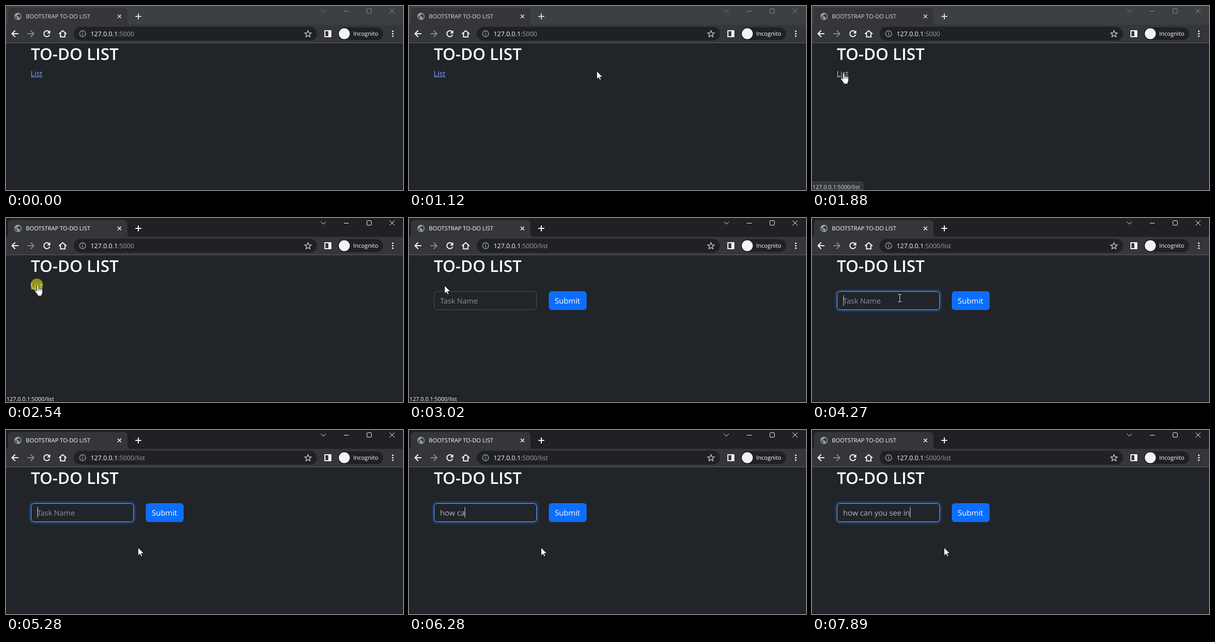
An HTML page for the animation above (8 s loop, 798 px wide and 372 px high).

```html
<!DOCTYPE html>
<html lang="en">
<head>
<meta charset="utf-8">
<title>To-do list</title>
<style>
  html, body { margin: 0; width: 100%; height: 100%; overflow: hidden; background: #212529; }
  svg { display: block; width: 798px; height: 372px; }
  text { font-family: "Open Sans", "Noto Sans", sans-serif; text-rendering: geometricPrecision; white-space: pre; }
  .line { fill: none; stroke: #fff; stroke-width: 2; }
  .dim { stroke: #85878a; }
  #win { --strip: #202124; --ink: #fff; --tool: #fff; --bubble: #202124; --edge: #25272a; }
  #win.idle { --strip: #3c4043; --ink: #dadce0; --tool: #8d9093; --bubble: #35363a; --edge: #4a4d51; }
</style>
</head>
<body>
<svg viewBox="0 0 798 372">
  <rect width="798" height="372" fill="#212529"/>
  <rect y="370" width="798" height="2" fill="#1c1e25"/>

  <g id="win">
    <rect width="798" height="38" fill="var(--strip)"/>
    <path d="M0 38q4 0 4-6V12q0-8 8-8H236q8 0 8 8V30q0 8 8 8Z" fill="#35363a"/>
    <path transform="translate(15.4 12.4) scale(.72)" fill="#9aa0a6" d="M12 2C6.48 2 2 6.48 2 12s4.48 10 10 10 10-4.48 10-10S17.52 2 12 2zm-1 17.93c-3.95-.49-7-3.85-7-7.93 0-.62.08-1.21.21-1.79L9 15v1c0 1.1.9 2 2 2v1.93zm6.9-2.54c-.26-.81-1-1.39-1.9-1.39h-1v-3c0-.55-.45-1-1-1H8v-2h2c.55 0 1-.45 1-1V7h2c1.1 0 2-.9 2-2v-.41c2.93 1.19 5 4.06 5 7.41 0 2.08-.8 3.97-2.1 5.39z"/>
    <text x="40" y="25" font-size="11.5" fill="var(--ink)">BOOTSTRAP TO-DO LIST</text>
    <g class="line" style="stroke: var(--ink)">
      <path d="M224.5 17.5l7 7m0-7l-7 7" stroke-width="1.6"/>
      <path d="M260 21h12M266 15v12"/>
    </g>
    <path class="line" style="stroke: var(--tool); stroke-width: 1" d="M633 7.5l5 5 5-5M679 10.5h10M726.5 5.5h7q1 0 1 1v7q0 1-1 1h-7q-1 0-1-1v-7q0-1 1-1ZM771 5l10 10m0-10l-10 10"/>

    <rect y="38" width="798" height="36" fill="#35363a"/>
    <rect y="74" width="798" height="1" fill="#626468"/>
    <path class="line" d="M25 56H12M18.5 49.5L12 56l6.500 6.500"/>
    <path class="line dim" d="M43 56h13M49.500 49.500L56 56l-6.500 6.500"/>
    <path class="line" d="M86.500 51.800A6 6 0 1 0 87.800 58"/>
    <path fill="#fff" d="M89 49v6.500h-6.500Z"/>
    <path class="line" d="M106.500 56.500L114 49.800l7.500 6.700M109.500 55v7.500h9V55"/>

    <rect x="136" y="42" width="489" height="28" rx="14" fill="#202124"/>
    <circle class="line" cx="154" cy="56" r="6" style="stroke: #9aa0a6; stroke-width: 1.4"/>
    <path d="M153.300 55h1.500v4.500h-1.500ZM153.300 52.300h1.500v1.500h-1.500Z" fill="#9aa0a6"/>
    <text x="170" y="60.600" font-size="12.9" fill="#fff">127.0.0.1<tspan id="path" fill="#9aa0a6"></tspan></text>
    <path class="line" style="stroke: #c8cacd; stroke-width: 1.4" d="M607 49.800l1.900 4.300 4.700.4-3.600 3.100 1.100 4.600-4.100-2.400-4.100 2.400 1.100-4.600-3.600-3.100 4.700-.4Z"/>
    <path class="line" d="M641 50h12v12h-12Z"/>
    <rect x="648" y="50" width="5" height="12" fill="#fff"/>
    <rect x="667" y="43" width="91" height="26" rx="13" fill="#202124"/>
    <circle cx="680" cy="56" r="11" fill="#f1f3f4"/>
    <text x="698" y="60.300" font-size="11.6" fill="#fff">Incognito</text>
    <g fill="#fff">
      <circle cx="777.5" cy="51" r="1.600"/><circle cx="777.5" cy="56" r="1.600"/><circle cx="777.5" cy="61" r="1.600"/>
    </g>

    <g id="status">
      <path d="M0 355.500H98.500q4 0 4 4V372H0Z" fill="var(--bubble)" stroke="var(--edge)"/>
      <text x="1" y="369.700" font-size="11.25" fill="var(--ink)">127.0.0.1:5000/list</text>
    </g>
  </g>

  <text x="50" y="109" font-size="32.7" font-weight="600" fill="#fff">TO-DO LIST</text>

  <g id="home">
    <text x="49.500" y="142" font-size="14.8">List</text>
    <rect x="50" y="143" width="23" height="1"/>
  </g>

  <g id="form">
    <rect id="ring" x="48" y="146" width="211" height="42" rx="8" fill="none" stroke="#0d6efd" stroke-width="4"/>
    <rect id="field" x="50.500" y="148.500" width="206" height="37" rx="6" fill="#212529"/>
    <text id="entry" x="62.500" y="173"></text>
    <rect id="caret" y="156" width="1" height="21" fill="#dee2e6"/>
    <rect id="button" x="281" y="148" width="76" height="38" rx="6"/>
    <text x="293" y="173" font-size="15.4" fill="#fff">Submit</text>
  </g>

  <circle id="press" r="12.500" fill="#ff0" opacity=".5"/>
  <g id="pointer">
    <path id="arrow" d="M.5.8V17L4.300 13.400 6.700 18.700 9.100 17.600 6.800 12.400H12Z" fill="#fff" stroke="#000" stroke-width=".8"/>
    <g id="hand" transform="translate(-5)" stroke="#000" stroke-width=".8">
      <path fill="#fff" d="M5 13V2.200a1.600 1.600 0 0 1 3.200 0V7.500a1.500 1.500 0 0 1 2.800.6 1.500 1.500 0 0 1 2.700.7 1.400 1.400 0 0 1 2.600 1V15.500c0 2-1 3.500-1.700 5V22.500H6.800V20.800C5 18.500 3 15.500 1 13a1.600 1.600 0 0 1 2.400-2Z"/>
      <path d="M8.200 7.500V12M11 8.500V12M13.700 9.500V12" fill="none"/>
    </g>
    <path id="beam" d="M-3.500-7.500h2.500q1.500 0 1.500 1.500 0-1.500 1.500-1.500h2M.5-6V6M-3.500 7.500h2.500q1.500 0 1.500-1.500 0 1.500 1.500 1.500h2" fill="none" stroke="#e8e8e8"/>
  </g>
</svg>
<script>
const $ = id => document.getElementById(id);
const show = (id, on) => $(id).style.display = on ? "" : "none";
const paint = (id, name, value) => $(id).setAttribute(name, value);
const clamp = v => Math.max(0, Math.min(1, v));
const between = (t, a, b) => t >= a && t < b;

const LOOP = 8000, ACTIVE = 2540, LOADED = 2680, FOCUS = 4130;
const MESSAGE = "how can you see in";
const KEYS = [5740, 5810, 5940, 6010, 6150, 6280, 6480, 6550, 6810,
              6940, 7080, 7140, 7340, 7410, 7610, 7760, 7820, 7890];

// from, to, steps, end x, end y, upward bend, even speed
const MOVES = [
  [520, 650, 3, 407, 150, 0, true],
  [980, 1740, 11, 64, 137, 55],
  [1810, 1880, 2, 62, 135, 0],
  [3020, 3580, 9, 332, 177, 0],
  [3650, 3790, 3, 330, 186, 0],
  [3860, 4130, 5, 176, 162, 0],
  [4470, 4670, 4, 197, 180, 0],
  [4870, 5080, 4, 265, 237, 0],
];

function pointerAt(t) {
  let x = 602, y = 268;
  for (const [from, to, steps, endX, endY, bend, even] of MOVES) {
    if (t < from) break;
    const step = Math.floor((t - from) / (to - from) * (steps - 1) + 1e-6) + 1;
    const p = clamp(step / steps);
    const e = even ? p : p * p * (3 - 2 * p);
    x += (endX - x) * e;
    y += (endY - y) * e - bend * 4 * e * (1 - e);
  }
  return [x, y];
}

function draw(t) {
  const [x, y] = pointerAt(t);
  const inside = (l, top, r, b) => x >= l && x <= r && y >= top && y <= b;
  const form = t >= LOADED;
  const onLink = !form && inside(48, 124, 75, 148);
  const onButton = form && inside(281, 148, 357, 186);
  const onField = form && inside(50, 148, 257, 186);

  $("win").className.baseVal = t < ACTIVE ? "idle" : "";
  $("path").textContent = form ? ":5000/list" : ":5000";
  $("status").style.opacity = clamp((t - 1670) / 200) * clamp((3150 - t) / 130);
  show("home", !form);
  show("form", form);
  paint("home", "fill", onLink ? "#b4bacf" : "#6ea8fe");

  const focus = clamp((t - FOCUS) / 130);
  paint("ring", "opacity", focus * .25);
  paint("field", "stroke", focus > .4 ? "#86b7fe" : "#495057");
  paint("button", "fill", onButton ? "#0b5ed7" : "#0d6efd");

  const count = KEYS.filter(k => k <= t).length;
  const entry = $("entry");
  entry.textContent = count ? MESSAGE.slice(0, count) : "Task Name";
  paint("entry", "font-size", count ? 15.2 : 14.9);
  paint("entry", "fill", count ? "#b0b5ba" : "#8b9095");
  show("caret", between(t, 4200, 4670) || t >= 5280);
  if (form) paint("caret", "x", 63 + (count ? Math.round(entry.getComputedTextLength() - .5) : 0));

  show("press", between(t, ACTIVE, 2680) || between(t, FOCUS, 4200));
  paint("press", "cx", x);
  paint("press", "cy", y);
  show("pointer", t >= 520);
  paint("pointer", "transform", `translate(${Math.round(x)} ${Math.round(y)})`);
  show("hand", onLink || onButton);
  show("beam", onField);
  show("arrow", !onLink && !onButton && !onField);
}

const start = performance.now();
function tick() {
  draw((performance.now() - start) % LOOP);
  requestAnimationFrame(tick);
}
tick();
</script>
</body>
</html>
```
